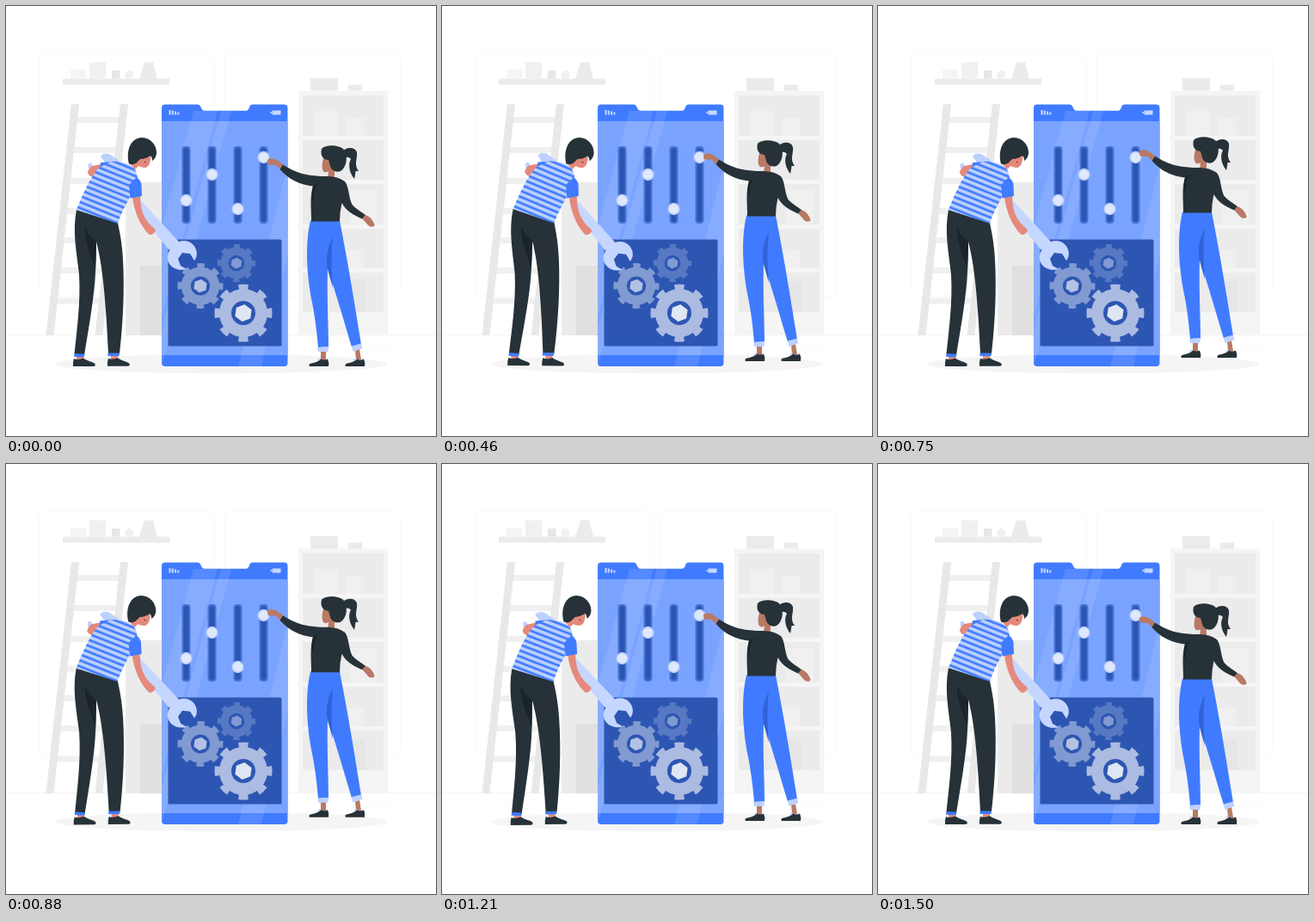
Recreate the animation shown at these times as an HTML page. Size 500 px wide and 500 px high, loop 1.54 s.

```html
<!DOCTYPE html>
<html lang="en">
<head>
<meta charset="utf-8">
<title>Phone settings</title>
<style>
  html, body { margin: 0; height: 100%; overflow: hidden; background: #fff; }
  svg { display: block; width: 100%; height: 100%; }
  .blue { fill: #407bff; }
  .dark { fill: #263238; }
  .pale { fill: #bdd1ff; }
  .rosy { fill: #e4897b; }
  .tan { fill: #b97964; }
</style>
</head>
<body>
<svg viewBox="0 0 500 500">
  <defs>
    <pattern id="stripes" width="60" height="6.5" patternUnits="userSpaceOnUse" patternTransform="translate(82 237) rotate(22)">
      <path class="pale" d="M0 0h60v7H0z"/>
      <path class="blue" d="M0 1.7h60v2.7H0z"/>
    </pattern>
    <g id="gear" fill="none" stroke="currentColor">
      <circle r="21" stroke-width="14"/>
      <circle r="30" stroke-width="7" pathLength="16" stroke-dasharray=".92 1.08" stroke-dashoffset=".46"/>
    </g>
    <path id="nut" d="M0-10 9-5V5L0 10-9 5V-5z" fill="currentColor" transform="rotate(8)"/>
    <g id="track">
      <rect x="-5" y="163" width="10" height="90" rx="4" fill="#4672d2"/>
      <rect x="-3" y="165" width="6" height="86" rx="3" fill="#2a55b3"/>
    </g>
    <g id="knob">
      <circle r="7.2" fill="#b4c9f8"/>
      <circle r="5.8" fill="#dfe8fc"/>
    </g>
  </defs>

  <!-- Room -->
  <g fill="none" stroke="#ebebeb" stroke-width=".5">
    <rect x="38.5" y="55" width="204" height="282.5" rx="5.5" opacity=".6"/>
    <rect x="254.5" y="55" width="204" height="282.5" rx="5.5" opacity=".6"/>
    <path d="M0 382.5H500"/>
    <path stroke-width=".25" d="M417 398.5h33M322 401.5h9M397 389.5h19M52 391h43M105 391h6M131 395h50"/>
  </g>
  <path fill="#ebebeb" d="M66 84.5h124v7H66zM161 65.5h10l5 19h-21z"/>
  <path fill="#f5f5f5" d="M75 74h18v10.5H75z"/>
  <path fill="#f0f0f0" d="M97 65.5h19v19H97z"/>
  <path fill="#e6e6e6" d="M123 75h9.5v9.5H123z"/>
  <circle cx="143.5" cy="80" r="5" fill="#f0f0f0"/>

  <path fill="#ebebeb" d="M139 205h43v178h-43z"/>
  <path fill="#e0e0e0" d="M156 302h26v81h-26z"/>
  <path stroke="#f0f0f0" stroke-width="7" d="M80 132.5h55M76 167.5h55M72 203.5h55M68 238.5h55M64 272.5h55M60 307.5h55M56 343h55"/>
  <path fill="#e8e8e8" d="M76 114h9L55.500 383h-9zM133 114h9l-29.500 269h-9z"/>

  <path fill="#f5f5f5" d="M340 98.5h104.5V383H340z"/>
  <path fill="#ebebeb" d="M345 104h94v47h-94zM345 156h94v46h-94zM345 207h94v47h-94zM345 259h94v46h-94zM345 310h94v46h-94zM354 84h32v14.5h-32zM398 91.5h16v7h-16z"/>
  <path fill="#f0f0f0" d="M357 122h29v29h-29zM396 130h20v21h-20zM400 214h32v40h-32zM396 283h20v22h-20z"/>
  <path fill="#e6e6e6" d="M390 320h28v36h-28z"/>
  <ellipse cx="250" cy="416" rx="193" ry="11.3" fill="#f5f5f5"/>

  <!-- Phone -->
  <path class="blue" d="M185 114.500H223q2.500 0 3.300 2.500 1.500 4.700 4.700 4.700H279q2.700 0 4-4 1-3.200 3.500-3.200H323.500q4 0 4 4V415q0 4-4 4H185q-4 0-4-4V118.500q0-4 4-4z"/>
  <path fill="#79a3ff" d="M181 134h146.500v272H181z"/>
  <path fill="#fff" opacity=".1" d="M218 122h28L181 361V257zM250 122h12l-81 298v-44zM327.500 185v104L297 419h-27z"/>
  <path fill="#fff" opacity=".7" d="M189.500 121h2v5.500h-2zM192.800 121.500h2v5h-2zM196.100 122.500h2v4h-2zM199.400 123.500h2v3h-2zM309.500 121.500h10v5h-10zM307.500 123h1.500v2h-1.500z"/>
  <use href="#track" x="209.500"/>
  <use href="#track" x="239.500"/>
  <use href="#track" x="269.500"/>
  <use href="#track" x="299.500"/>
  <use href="#knob" x="209.500" y="226"/>
  <use href="#knob" x="239.500" y="196"/>
  <use href="#knob" x="269.500" y="236"/>
  <use href="#knob" x="299.500" y="176"/>
  <rect x="188.500" y="271.500" width="132" height="124" rx="1.500" fill="#2d56b3"/>
  <g transform="translate(268 299) scale(.66)">
    <use href="#gear" color="#5778c2"/><use href="#nut" color="#819ad1"/>
  </g>
  <g transform="translate(226 325.500) scale(.79)">
    <use href="#gear" color="#819ad1"/><use href="#nut" color="#b3c2e4"/>
  </g>
  <g transform="translate(276 357)">
    <use href="#gear" color="#abbbe1"/><use href="#nut" color="#dfe6f4"/>
  </g>

  <!-- Man with wrench -->
  <g id="man">
    <path class="pale" d="M110 175q2-5 10-3l12 8-12 9z"/>
    <path fill="#c5d7ff" d="M150 219L201 274 190 284 150 236z"/>
    <path fill="#c5d7ff" d="M195 278C201 272 212 271 218 278 223 284 223 291 219 296L214 288 205 287 200 294 203 302 210 306C200 309 190 304 188 295 187 290 189 286 191 283z"/>
    <ellipse class="pale" cx="98" cy="186" rx="2.500" ry="3.500"/>
    <path class="rosy" d="M111 184L100 186q-5 4-5 8 3 6 8 4l7-6z"/>
    <path class="rosy" d="M82 406h8v6h-8zM122 405h8v6h-8z"/>
    <g id="shoe" class="dark">
      <path d="M79 410C82 411.500 86 411 90 409.500 95 413 101 414 103 415.500q2 3-1 3.500H78q-.500-5 1-9z"/>
    </g>
    <use href="#shoe" x="40" y="-.300"/>
    <path class="dark" d="M82 237C77 262 82 285 85 312 87 345 82 380 79.500 405L91 406C97 370 103 335 104 310Q105 290 105 274C112 300 116 340 119 404L132 404C136 370 138 330 136 295 135 275 132 262 130 252z"/>
    <path fill="#1b2429" d="M92 257q3 10 13 17l-1 32C99 290 91 275 92 257z"/>
    <path class="blue" d="M79.500 404l12 .800-.800 3.700-11.700-.800zM118.500 403.500h13.500l-.500 3.500h-13z"/>
    <path class="blue" d="M110 182l14-1-4 10-11 2z"/>
    <path fill="url(#stripes)" d="M122 181C134 180 146 184 150 190 156 200 152 212 144 222 139 232 133 243 130 253L82 237C88 222 97 200 108 188z"/>
    <path class="rosy" d="M147 222l9-1C156 234 159 243 164 250 168 256 173 258 174 261q-2 5-7 5C160 260 150 245 147 222z"/>
    <path class="blue" d="M152 199q5 4 5.500 9l.500 13-13.500 2.500L143 208z"/>
    <path class="rosy" d="M143 182l7-10h18q1 6-1 11-2 5-6 5-4 0-7-2l-4 4z"/>
    <path class="dark" d="M143 183.500C139 167 146 153 158 153 168 153 175 162 175 170 175 175 173 178 170 180q0-4-2-6-6 4-12 4l-5 5q-4 2-8 .500z"/>
    <path stroke="#263238" fill="none" d="M161 181l2 1"/>
  </g>

  <!-- Woman -->
  <g id="woman">
    <path class="tan" d="M366 401h6v11h-6zM406 400l5-1 2 12h-6z"/>
    <g id="pump">
      <path class="dark" d="M366 410.500q4 2 8 0 2 4 1 8.500H353q-2-2.500 2-3.500 7-1 11-5z"/>
      <path class="pale" d="M362 411.500l3-2.500 1 1.500-2 2z"/>
    </g>
    <use href="#pump" x="42"/>
    <path class="blue" d="M354 249.500C348 275 349 310 356 345 360 365 362 385 363 397L375 396.500C375 370 373 340 374 305 384 335 394 370 402 396.500L413 393.500C406 350 398 300 388 249.500z"/>
    <path fill="#2f63d8" d="M380 269C372 283 372 298 374 306l6 22C378 305 378 288 380 269z"/>
    <path class="pale" d="M362 397l13-1-.500 6H363zM402 395.500l11-3 1.500 5.500-11 4z"/>
    <path class="tan" d="M322 184L314 178.500Q306 176 304 179L304.500 184Q309 185.500 313 184.500L319 190z"/>
    <path class="tan" d="M414 247l4-4q6 2 9 8 3 5 0 5.500-5 1-8-4z"/>
    <path class="tan" d="M369 177C367 184 367 191 370 193q3 1 5-1l-1 8 8 1v-22z"/>
    <path class="dark" d="M366 198C352 197 340 196 322 184.500L318.500 190C326 198 336 207 357 209.500 353 222 355 235 355 250.500H388Q388 240 390.500 229C396 239 404 243 414 247.500L418 243C413 239 407 236 402.500 231 398 222 399 210 394 204Q386 198 374 198z"/>
    <path fill="#1b2429" d="M363 206q-6 6-5 22-4-8-1-19z"/>
    <path class="dark" d="M367 166C372 161 385 161 392 166 398 172 397 187 389 192 384 194 378 191 377 186L375 179C369 179 365 174 367 166z"/>
    <path class="dark" d="M391 169C397 163 406 164 408 170 409 178 404 184 410 192l-3.500 0q-.500 5-1.500 9C400 195 397 185 401 178q-2-3-7-2z"/>
  </g>
</svg>
<script>
  const LOOP = 1540, CYCLE = 1500, FPS = 24;
  const man = document.getElementById('man');
  const woman = document.getElementById('woman');

  // Linear swing: 0, 1, 0, -1, 0 over one cycle.
  const swing = p => p < .25 ? 4 * p : p < .75 ? 2 - 4 * p : 4 * p - 4;
  // Linear rise and fall: 0, 1, 0 over one cycle.
  const lift = p => 1 - Math.abs(1 - 2 * p);

  function draw(now) {
    const step = Math.floor((now % LOOP + 5) * FPS / 1000);
    const phase = Math.min(1, step * 1000 / FPS / CYCLE);
    man.setAttribute('transform', `rotate(${swing(phase)} 150 286)`);
    woman.setAttribute('transform', `translate(0 ${-10 * lift(phase)})`);
  }

  const start = performance.now();
  function tick() {
    draw(performance.now() - start);
    requestAnimationFrame(tick);
  }
  tick();
</script>
</body>
</html>
```
